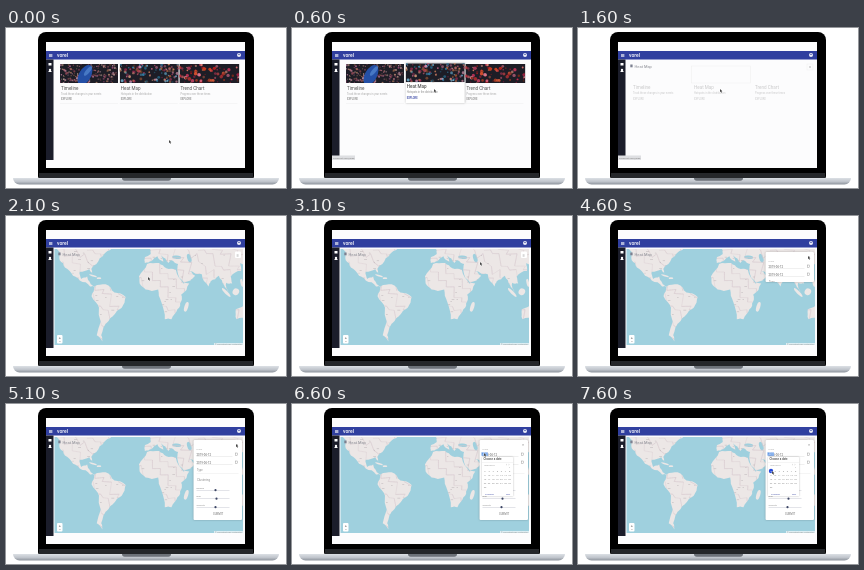
An HTML page with a canvas for the animation above (8 s loop, 280 by 160 pixels).

```html
<!DOCTYPE html>
<html lang="en">
<head>
<meta charset="utf-8">
<title>Dashboard on a laptop</title>
<style>
html, body { margin: 0; width: 100%; height: 100%; overflow: hidden; background: #fff; }
canvas { display: block; }
</style>
</head>
<body>
<canvas id="stage" width="280" height="160"></canvas>
<script>
const ctx = document.getElementById('stage').getContext('2d');
const LOOP = 8000;
const BLUE = '#303f9f', INK = '#555', SOFT = '#888', PALE = '#aaa', SEA = '#9fd0de', LAND = '#ece7e6';
const CARDS = [
  { title: 'Timeline', note: 'Track these changes in your events', hues: [330, 20, 350] },
  { title: 'Heat Map', note: 'Hotspots in the distribution', hues: [340, 200, 20] },
  { title: 'Trend Chart', note: 'Progress over these times', hues: [0, 12, 345] }
];

const rect = (x, y, w, h, color) => { ctx.fillStyle = color; ctx.fillRect(x, y, w, h); };
const round = (x, y, w, h, r, color) => {
  ctx.fillStyle = color;
  ctx.beginPath();
  ctx.roundRect(x, y, w, h, r);
  ctx.fill();
};
const oval = (x, y, rx, ry, color, angle = 0) => {
  ctx.fillStyle = color;
  ctx.beginPath();
  ctx.ellipse(x, y, rx, ry, angle, 0, 7);
  ctx.fill();
};
const dot = (x, y, r, color) => oval(x, y, r, r, color);
const text = (str, x, y, size, color = INK, weight = 400) => {
  ctx.font = `${weight} ${size}px Roboto, sans-serif`;
  ctx.fillStyle = color;
  ctx.fillText(str, x, y);
};
const isolated = draw => { ctx.save(); draw(); ctx.restore(); };
const clipped = (x, y, w, h, draw) => isolated(() => {
  ctx.beginPath();
  ctx.rect(x, y, w, h);
  ctx.clip();
  draw();
});
const shadowed = draw => isolated(() => {
  ctx.shadowColor = 'rgba(0,0,0,.3)';
  ctx.shadowBlur = 2;
  draw();
});
const randomFrom = seed => () => (seed = seed * 16807 % 2147483647) / 2147483647;

// Mercator projection of degrees to stage pixels.
const project = (lon, lat) => {
  const rise = Math.log(Math.tan(Math.PI / 4 + lat * Math.PI / 360)) * 180 / Math.PI;
  return [145.5 + lon * .74, 76.5 - rise * .74];
};

// Capes and bays as "lon,lat"; the coast between them is roughened.
const CONTINENTS = [
  '-140,60 -124,48 -124,40 -117,32 -106,22 -97,16 -83,8 -77,8 -83,13 -87,21 -95,18 -97,27 -84,30 -80,25 -81,31 -70,42 -55,50 -55,60',
  '-77,8 -62,11 -50,0 -35,-6 -40,-20 -48,-26 -58,-36 -68,-50 -66,-55 -74,-50 -71,-20 -81,-5',
  '-6,36 -17,21 -16,12 -8,4 9,4 13,-12 18,-34 27,-34 35,-22 40,-12 40,-3 51,12 43,12 33,29 20,31 10,37',
  '-2,60 -1,46 -9,43 -9,37 0,39 8,44 16,38 13,45 23,37 27,40 36,36 35,28 44,13 59,22 49,30 57,26 68,24 77,8 80,15 91,22 98,10 104,1 101,13 109,12 107,21 121,28 120,37 127,35 140,50 140,60',
  '114,-22 130,-13 142,-11 142,-38 130,-32 115,-34'
];

function coastline(points, random) {
  const corners = points.split(' ').map(pair => project(...pair.split(',').map(Number)));
  let coast = corners;
  for (let pass = 0; pass < 2; pass++) {
    coast = coast.flatMap(([x, y], i) => {
      const [nextX, nextY] = coast[(i + 1) % coast.length];
      const bend = (random() - .5) * .25;
      return [[x, y], [(x + nextX) / 2 + (nextY - y) * bend, (y + nextY) / 2 - (nextX - x) * bend]];
    });
  }
  return `M${coast.join('L')}Z`;
}

const coastRandom = randomFrom(41);
const land = new Path2D(CONTINENTS.map(points => coastline(points, coastRandom)).join(''));

// Jittered brick pattern that reads as country borders.
function drawBorders() {
  const random = randomFrom(53), size = 8;
  const corner = (col, row) => {
    const angle = Math.sin(col * 12.9 + row * 78.2) * 40;
    return [48 + col * size + Math.cos(angle) * 2.5, 32 + row * size + Math.sin(angle) * 2.5];
  };
  ctx.lineWidth = .35;
  ctx.strokeStyle = '#d3c6cb';
  ctx.beginPath();
  for (let row = 0; row < 13; row++) {
    for (let col = 0; col < 25; col++) {
      const next = (row + col) % 2 ? corner(col, row + 1) : corner(col + 1, row);
      ctx.moveTo(...corner(col, row));
      ctx.lineTo(...next);
      if (random() < .6) ctx.lineTo(...corner(col + 1, row + 1));
    }
  }
  ctx.stroke();
  for (let i = 0; i < 130; i++) {
    rect(48 + random() * 188, 33 + random() * 92, 1 + random() * 2, .5, 'rgba(110,100,110,.4)');
  }
}

function drawMap() {
  clipped(48.5, 33, 188.5, 96, () => {
    rect(48, 32, 190, 98, SEA);
    ctx.fillStyle = LAND;
    ctx.fill(land);
    const island = (lon, lat, rx, ry, angle, color = LAND) => oval(...project(lon, lat), rx, ry, color, angle);
    island(-79, 22, 4, .8, .3);
    island(-71, 19, 2.3, .9, 0);
    island(47, -19, 1.9, 5, .3);
    island(101, 0, 6, 1.5, .8);
    island(114, 1, 3.2, 3.5, .5);
    island(122, 13, 1.3, 4, -.2);
    island(34, 43, 4.5, 1.7, .1, SEA);
    island(51, 42, 2, 4.5, -.3, SEA);
    isolated(() => { ctx.clip(land); drawBorders(); });
  });
  drawHeading();
  round(51, 119, 5.5, 8.5, 1, '#fff');
  text('+', 52.7, 122.8, 4);
  text('−', 52.7, 126.5, 4);
  round(229, 35.5, 6, 6.5, 1, '#fff');
  text('≡', 230.6, 40.5, 4, SOFT);
  rect(208, 127, 29, 2, 'rgba(255,255,255,.65)');
  text('© OpenStreetMap contributors', 209, 128.7, 2, SOFT);
}

function drawLaptop() {
  rect(0, 0, 280, 160, '#fff');
  round(32, 4, 216, 147, [8, 8, 3, 3], '#000');
  rect(33, 145, 214, 5, '#25272a');
  rect(40, 14, 199, 126, '#fcfcfd');
  const metal = ctx.createLinearGradient(0, 150, 0, 157);
  metal.addColorStop(0, '#dce0e5');
  metal.addColorStop(.5, '#c0c5cc');
  metal.addColorStop(1, '#858b94');
  round(7, 150, 266, 6.5, [0, 0, 7, 7], metal);
  round(116, 150, 49, 2.7, [0, 0, 3, 3], '#6d7279');
}

function drawFrame() {
  rect(40, 23, 199, 8.5, BLUE);
  for (let i = 0; i < 3; i++) rect(43, 26 + i * 1.2, 3.4, .6, '#fff');
  text('vorel', 51, 29, 5, '#fff', 500);
  dot(233, 27, 2, '#e8eaf6');
  dot(233, 26.4, .7, BLUE);
  rect(40, 31.5, 7.5, 100.5, '#1b1d2a');
  rect(42.5, 35, 3, 2.5, '#fff');
  dot(44, 42, 1.2, '#fff');
  rect(42.5, 43, 3, 1, '#fff');
}

// Soft coloured flecks stand in for the card photos.
function drawPhoto(index, x, y, w) {
  const random = randomFrom(index * 97 + 31);
  clipped(x, y, w, 19, () => {
    rect(x, y, w, 19, '#1d1d26');
    for (let i = 0; i < 180 - index * 50; i++) {
      const hue = CARDS[index].hues[i % 3];
      const color = `hsla(${hue}, ${35 + index * 20}%, ${30 + random() * 45}%, ${.4 + random() * .5})`;
      dot(x + random() * w, y + random() * 19, .5 + random() * (.6 + index * .4), color);
    }
    if (index === 0) {
      oval(x + 25, y + 11, 6, 11, '#244fa5', .5);
      oval(x + 28, y + 7, 2, 6, '#4778c4', .7);
    }
  });
}

function drawCards(hover) {
  CARDS.forEach(({ title, note }, i) => {
    const x = 54 + i * 59.7, active = hover && i === 1, lift = active ? 1.5 : 0;
    if (active) shadowed(() => rect(x, 35, 59, 40, '#fff'));
    drawPhoto(i, x, 36 - lift / 2, 58 + i);
    text(title, x + 1, 61.5 - lift, 4.6, INK, active ? 500 : 400);
    text(note, x + 1, 66.5 - lift, 2.6, active ? SOFT : PALE);
    text('EXPLORE', x + 1, 72.3 - lift, 2.6, active ? BLUE : SOFT, 500);
    rect(x, 75, 58, .3, '#e4e4e4');
  });
}

function drawHeading() {
  rect(52.3, 36.5, 2.3, 2.8, '#7c8090');
  text('Heat Map', 56.5, 39.5, 4, '#888a92');
}

function drawFading() {
  drawHeading();
  ctx.strokeStyle = '#eee';
  ctx.lineWidth = .5;
  ctx.strokeRect(113.5, 38, 59, 17);
  ctx.strokeRect(229, 36, 6, 6);
  dot(232, 39, 1, '#ccc');
  isolated(() => {
    ctx.globalAlpha = .3;
    CARDS.forEach(({ title, note }, i) => {
      const x = 55 + i * 61;
      text(title, x, 60.5, 4.6);
      text(note, x, 66, 2.6);
      text('EXPLORE', x, 72, 2.6);
    });
  });
}

function drawPanel(open) {
  const height = open ? 80 : 30;
  shadowed(() => round(187.5, 36, 48.5, height, 1, '#fff'));
  clipped(187, 36, 49, height, () => {
    text('×', 230, 42, 4, SOFT);
    text('From', 190.5, 46, 2.5, PALE);
    for (const y of [51.5, 59.5]) {
      text('2019-06-12', 190.5, y, 2.9, '#666');
      rect(190.5, y + 1.2, 36, .3, '#ccc');
      ctx.strokeStyle = SOFT;
      ctx.lineWidth = .4;
      ctx.strokeRect(229.4, y - 2.5, 2.4, 2.4);
    }
    text('Type', 191, 67, 2.7, SOFT);
    rect(190.5, 69.5, 42, .3, '#ddd');
    text('Clustering', 191, 77, 2.9, SOFT);
    ['Radius', 'Blur', 'Opacity'].forEach((label, i) => {
      const y = 86 + i * 8.5;
      text(label, 190.5, y - 1.5, 2.5, SOFT);
      rect(190.5, y, 33, .4, '#b9bcc8');
      dot(209.5 + i % 2, y + .2, 1.1, '#3c4564');
    });
    text('SUBMIT', 207, 110.8, 2.8, '#777');
  });
}

function drawPicker(selected) {
  rect(189.5, 48.3, 6.5, 3.4, '#659be8');
  text('2019', 190.5, 51.4, 2.7, '#fff');
  shadowed(() => round(190, 53, 31, 39, .5, '#fff'));
  text('Choose a date', 191.5, 56.4, 2.8, '#444', 500);
  rect(190, 58, 31, .3, '#ddd');
  text('JUN 2019', 192, 61.5, 2.4, SOFT);
  text('‹  ›', 214, 61.5, 3, SOFT);
  isolated(() => {
    ctx.textAlign = 'center';
    for (let day = 1; day <= 30; day++) {
      const cell = day + 5, marked = selected && day === 2;
      const x = 193 + cell % 7 * 4.1, y = 63.4 + Math.floor(cell / 7) * 4;
      if (marked) dot(x, y - .4, 2.2, '#2449d8');
      text(day, x, y + .5, 2.3, marked ? '#fff' : '#777');
    }
  });
  text('CANCEL', 193, 90.5, 2.4, BLUE);
  text('SET', 214, 90.5, 2.4, BLUE);
}

// Each stop: start time and pointer position.
const POINTER = [[0, 163, 112], [100, 142, 61], [3100, 188, 46], [3600, 221, 41], [4100, 230, 40],
  [5600, 230, 49], [6100, 192, 49], [7100, 205, 67], [7600, 194, 67]];
const arrow = new Path2D('M0 0V3.2L.8 2.5 1.4 3.7 2 3.4 1.4 2.3H2.4Z');

function drawPointer(t) {
  const [, x, y] = POINTER.findLast(([start]) => t >= start);
  isolated(() => {
    ctx.translate(x, y);
    ctx.lineWidth = .5;
    ctx.strokeStyle = '#fff';
    ctx.stroke(arrow);
    ctx.fillStyle = '#444';
    ctx.fill(arrow);
  });
}

function draw(now) {
  const t = now % LOOP;
  drawLaptop();
  if (t < 1600) drawCards(t >= 100);
  else if (t < 2100) drawFading();
  else drawMap();
  if (t >= 4600) drawPanel(t >= 5100);
  if (t >= 6600) drawPicker(t >= 7600);
  drawFrame();
  if (t >= 600 && t < 2100) {
    rect(40, 127.5, 23, 4.5, '#dedfe2');
    text('localhost:4200/map', 41, 130.7, 2.4, '#777');
  }
  drawPointer(t);
  requestAnimationFrame(draw);
}
requestAnimationFrame(draw);
</script>
</body>
</html>
```
